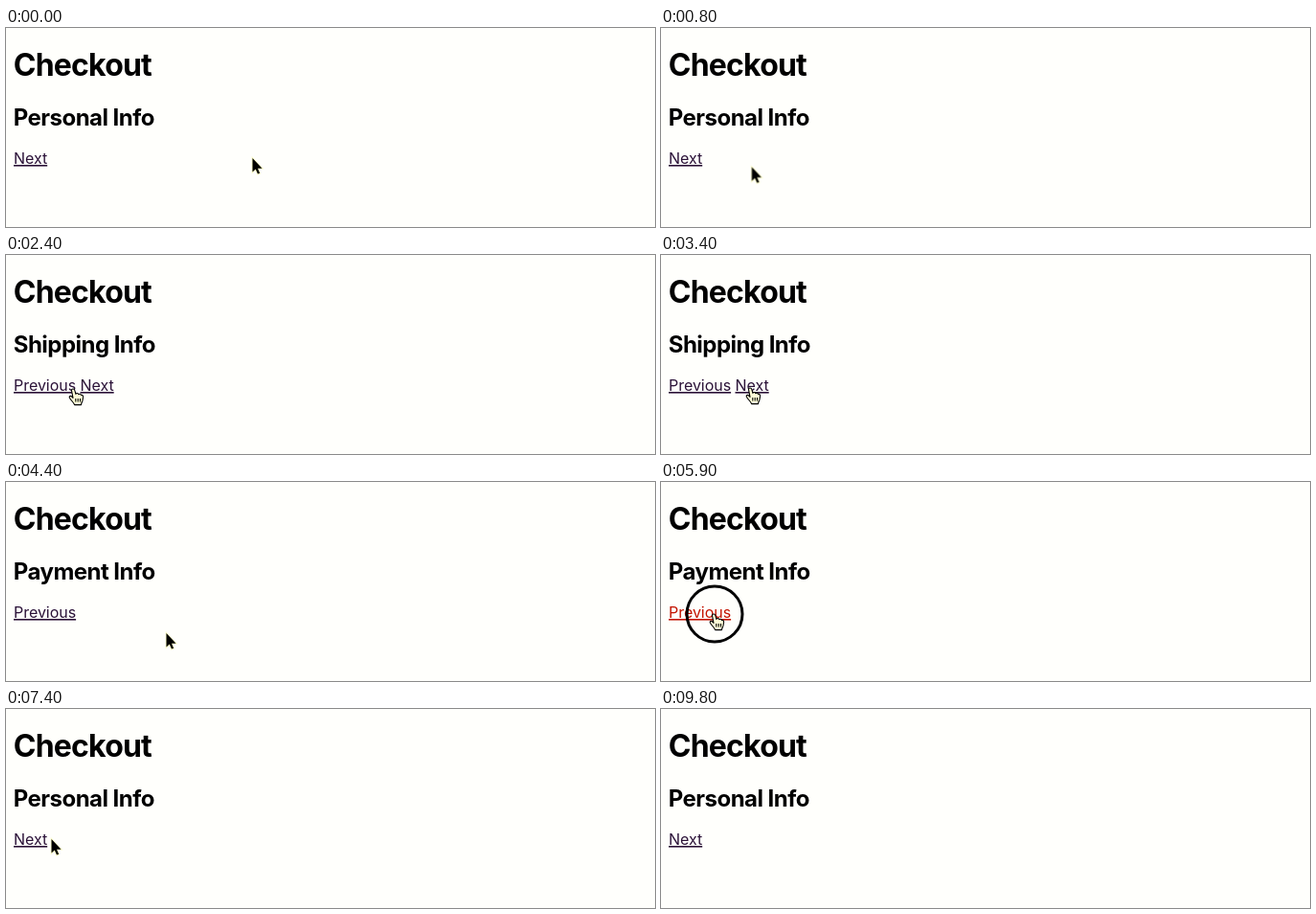
An HTML page that plays this animation: 678 px wide and 208 px high, repeating every 10 s.

```html
<!DOCTYPE html>
<html lang="en">
<head>
<meta charset="utf-8">
<title>Checkout</title>
<style>
html, body { margin: 0; width: 100%; height: 100%; overflow: hidden; background: #fffffc; }
svg { display: block; width: 678px; height: 208px; font-family: Inter, sans-serif; }
.h1, .h2 { font-weight: 700; fill: #000; }
.h1 { font-size: 32px; letter-spacing: -.025em; }
.h2 { font-size: 24px; letter-spacing: -.0225em; }
.link { font-size: 16px; letter-spacing: -.002em; fill: #2b1238; text-decoration: underline 1px; text-underline-offset: 1px; }

/* 1% of the loop is 100 ms */
.personal, .shipping, .payment, .prev, .arrow, .hand, .ring { animation: 10s step-end infinite; }
.personal { animation-name: personal; }
.shipping { animation-name: shipping; }
.payment { animation-name: payment; }
.prev { animation-name: press; }
.arrow { animation-name: arrow; stroke: #ffffc8; stroke-width: 1.6; paint-order: stroke; }
.hand { animation-name: hand; fill: #ffffd8; stroke: #000; stroke-width: 1.1; stroke-linejoin: round; }
.ring { animation-name: ring; fill: none; stroke: #000; stroke-width: 3; }
.pointer { animation: move 10s infinite; }

@keyframes personal {
  0%, 67%, 100% { visibility: visible; }
  18% { visibility: hidden; }
}
@keyframes shipping {
  0%, 36%, 67%, 100% { visibility: hidden; }
  18%, 60% { visibility: visible; }
}
@keyframes payment {
  0%, 60%, 100% { visibility: hidden; }
  36% { visibility: visible; }
}
@keyframes press {
  0%, 60%, 67%, 100% { fill: #2b1238; }
  58%, 66% { fill: #c41400; }
}
@keyframes arrow {
  0%, 37%, 68% { visibility: visible; }
  11%, 54%, 84%, 100% { visibility: hidden; }
}
@keyframes hand {
  0%, 37%, 68%, 100% { visibility: hidden; }
  11%, 54% { visibility: visible; }
}
@keyframes ring {
  0%, 18%, 37%, 60%, 68%, 100% { visibility: hidden; }
  16%, 35%, 58%, 66% { visibility: visible; }
}
@keyframes move {
  0% { transform: translate(258px, 136px); animation-timing-function: steps(3); }
  3% { transform: translate(238px, 140px); animation-timing-function: steps(4); }
  7% { transform: translate(118px, 147px); animation-timing-function: steps(3); }
  10% { transform: translate(50px, 142px); animation-timing-function: steps(3); }
  13%, 20% { transform: translate(30px, 138px); animation-timing-function: steps(4); }
  24% { transform: translate(71px, 140px); animation-timing-function: steps(4); }
  28%, 37% { transform: translate(94px, 139px); animation-timing-function: steps(4); }
  41% { transform: translate(146px, 153px); animation-timing-function: steps(3); }
  44% { transform: translate(168px, 158px); animation-timing-function: steps(3); }
  47%, 49% { transform: translate(170px, 163px); animation-timing-function: steps(3); }
  52% { transform: translate(100px, 149px); animation-timing-function: steps(3); }
  55%, 70% { transform: translate(56px, 138px); animation-timing-function: steps(3); }
  73%, 74% { transform: translate(48px, 136px); animation-timing-function: steps(3); }
  77%, 79% { transform: translate(48px, 143px); animation-timing-function: steps(4); }
  83%, 100% { transform: translate(48px, 171px); }
}
</style>
</head>
<body>
<svg viewBox="0 0 678 208">
  <text class="h1" x="7.8" y="50">Checkout</text>
  <g class="personal">
    <text class="h2" x="7.8" y="102">Personal Info</text>
    <text class="link" x="8" y="142">Next</text>
  </g>
  <g class="shipping">
    <text class="h2" x="7.8" y="102">Shipping Info</text>
    <text class="link prev" x="8" y="142">Previous</text>
    <text class="link" x="77.5" y="142">Next</text>
  </g>
  <g class="payment">
    <text class="h2" x="7.8" y="102">Payment Info</text>
    <text class="link prev" x="8" y="142">Previous</text>
  </g>
  <g class="pointer">
    <circle class="ring" r="29"/>
    <path class="arrow" d="M-.5 0V14.6L2.8 11.6 5 16.6 7.2 15.7 5 10.8H9.6Z"/>
    <path class="hand" d="M-2.5 1.6C-2.7-.4 .3-.6 .8 1.4L1.9 5.4C2.4 4 4.5 4.2 4.8 5.7 5.7 4.8 7.3 5.2 7.5 6.6 8.7 6 9.7 7 9.6 8.4L9 12.2C8.5 14 7.6 14.4 7.5 16.6H.6C0 14.4-2.8 12.4-4.6 9.2-5.4 7.4-3.4 6.8-2.2 8.2L-1 9.4ZM1.8 10V13.4M4.2 10V13.4M6.5 10V13.4"/>
  </g>
</svg>
</body>
</html>
```
